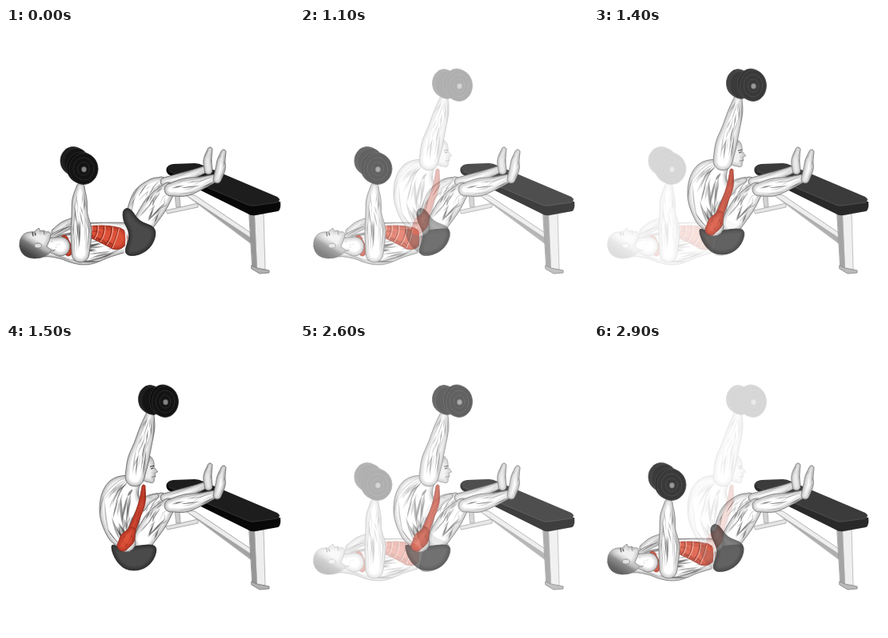
Write an HTML page with a canvas that moves like this. It is 360 by 360 pixels and loops after 3000 ms.

```html
<!DOCTYPE html>
<html lang="en">
<head>
<meta charset="utf-8">
<title>Dumbbell sit-up</title>
<style>
html, body { margin: 0; width: 100%; height: 100%; overflow: hidden; background: #fff; }
canvas { display: block; width: 360px; height: 360px; }
</style>
</head>
<body>
<canvas id="stage" width="360" height="360"></canvas>
<script>
const SIZE = 360;
const stage = document.getElementById('stage').getContext('2d');
let g;    // context being drawn into
let seed;

const random = () => (seed = seed * 16807 % 2147483647) / 2147483647;
const between = (a, b) => a + (b - a) * random();

const SKIN = { fill: '#fff', edge: '#5c5c5c', shade: '60,60,60', streak: '50,50,50' };
const RED = { fill: '#dd5139', edge: '#8e2b1c', shade: '110,15,5', streak: '100,15,8' };
const CLOTH = { fill: '#4a4a4a', edge: '#2a2a2a', shade: '0,0,0', streak: '20,20,20' };

// Catmull-Rom value at u (0..1) through a list of [x, y, r] keys.
function spline(keys, u) {
  const n = keys.length - 1;
  const i = Math.min(n - 1, Math.floor(u * n));
  const t = u * n - i;
  const key = j => keys[Math.max(0, Math.min(n, j))];
  const [a, b, c, d] = [key(i - 1), key(i), key(i + 1), key(i + 2)];
  return b.map((v, k) => v + t / 2 * (c[k] - a[k] +
    t * (2 * a[k] - 5 * v + 4 * c[k] - d[k] + t * (3 * (v - c[k]) + d[k] - a[k]))));
}

// Point in a limb: u runs along it, v across it from -1 to 1.
function inLimb(keys, u, v) {
  const [x, y, r] = spline(keys, u);
  const [ax, ay] = spline(keys, Math.max(0, u - 0.02));
  const [bx, by] = spline(keys, Math.min(1, u + 0.02));
  const len = Math.hypot(bx - ax, by - ay) || 1;
  return [x - (by - ay) / len * r * v, y + (bx - ax) / len * r * v];
}

function outline(keys) {
  const steps = 24, half = 8, path = new Path2D();
  const side = (v, back) => {
    for (let i = 0; i <= steps; i++) path.lineTo(...inLimb(keys, (back ? steps - i : i) / steps, v));
  };
  const cap = (u, from) => {
    const [x, y, r] = spline(keys, u);
    const [px, py] = inLimb(keys, u, from);
    const start = Math.atan2(py - y, px - x);
    for (let i = 1; i < half; i++) {
      const a = start + Math.PI * i / half;
      path.lineTo(x + r * Math.cos(a), y + r * Math.sin(a));
    }
  };
  side(-1, false);
  cap(1, -1);
  side(1, true);
  cap(0, 1);
  path.closePath();
  return path;
}

// Fill with soft inner shading and a thin edge.
function solid(path, tone) {
  g.fillStyle = tone.fill;
  g.fill(path);
  g.save();
  g.clip(path);
  for (const w of [10, 6, 3]) {
    g.strokeStyle = `rgba(${tone.shade},.12)`;
    g.lineWidth = w;
    g.stroke(path);
  }
  g.restore();
  g.strokeStyle = tone.edge;
  g.lineWidth = 0.8;
  g.stroke(path);
}

// Muscle: a rounded limb with slim tapering streaks along its fibres.
function muscle(keys, count = 14, tone = SKIN) {
  seed = Math.round(keys[0][0] * 977 + keys[0][1] * 31);
  solid(outline(keys), tone);
  for (let i = 0; i < count; i++) {
    const v = between(-0.9, 0.9), drift = between(-0.35, 0.35), wide = between(0.05, 0.16);
    const start = between(0, 0.75), end = Math.min(1, start + between(0.15, 0.4));
    const at = (k, w) => inLimb(keys, start + (end - start) * k,
      Math.max(-1, Math.min(1, v + drift * k + w)));
    g.beginPath();
    g.moveTo(...at(0, 0));
    g.quadraticCurveTo(...at(0.5, wide), ...at(1, 0));
    g.quadraticCurveTo(...at(0.5, -wide), ...at(0, 0));
    g.fillStyle = `rgba(${tone.streak},${between(0.2, 0.65)})`;
    g.fill();
  }
}

// Closed smooth shape through a few corner points.
function blob(points) {
  const n = points.length, path = new Path2D();
  const mid = i => {
    const [a, b] = [points[i % n], points[(i + 1) % n]];
    return [(a[0] + b[0]) / 2, (a[1] + b[1]) / 2];
  };
  path.moveTo(...mid(0));
  for (let i = 1; i <= n; i++) path.quadraticCurveTo(...points[i % n], ...mid(i));
  return path;
}

function shape(d, fill, edge) {
  const path = new Path2D(d);
  g.fillStyle = fill;
  g.fill(path);
  if (edge) stroke(path, edge);
}

function stroke(path, color, width = 0.8) {
  g.strokeStyle = color;
  g.lineWidth = width;
  g.stroke(typeof path === 'string' ? new Path2D(path) : path);
}

function disc(x, y, rx, ry, fill, edge) {
  const path = new Path2D();
  path.ellipse(x, y, rx, ry, 0, 0, Math.PI * 2);
  g.fillStyle = fill;
  g.fill(path);
  stroke(path, edge);
}

function dumbbell(back, front, rx, ry) {
  const [bx, by] = back, [fx, fy] = front;
  for (let i = 0; i < 3; i++) disc(bx + i * 2, by + i, rx - 2, ry - 2, '#141414', '#333');
  disc(fx - 3, fy - 1.5, rx, ry, '#0c0c0c', '#303030');
  for (const k of [1, 0.72, 0.42]) disc(fx, fy, rx * k, ry * k, '#131313', '#303030');
  disc(fx + 0.5, fy + 0.7, 3.2, 3.5, '#858585', '#444');
}

function bench() {
  shape('M209 184h6l3 40h-5Z', '#ccc', '#999');
  shape('M200 228L240 219V224L202 232Z', '#e2e2e2', '#999');
  shape('M224 208L236 209L306 256V269Z', '#ececec', '#999');
  shape('M224 208L306 262V269Z', '#a3a3a3');
  shape('M304 231L311 234L314 301L308 298Z', '#969696', '#888');
  shape('M311 234L322 232L324 302L314 301Z', '#eee', '#aaa');
  shape('M307 297L314 300L329 303V306L317 307L307 301Z', '#b0b0b0', '#777');
  shape('M201 174Q199 179 203 183L302 232Q306 235 312 234L340 229Q344 227 343 217L306 218Z', '#080808');
  shape('M201 175Q202 171 209 170L236 169Q241 169 247 172L339 211Q345 215 339 218L311 222Q305 223 300 220L204 179Z', '#1d1d1d');
  stroke('M204 179L300 220Q305 223 311 222L339 218', '#3b3b3b');
}

function legs() {
  muscle([[160, 233, 10], [171, 212, 13], [184, 198, 10], [194, 192, 6]], 16);
  muscle([[198, 192, 5], [220, 187, 6], [238, 181, 5], [250, 176, 4]], 8);
  muscle([[253, 178, 5], [252, 165, 5], [255, 152, 3]], 5);
  muscle([[172, 244, 13], [188, 220, 14], [203, 202, 9]], 22);
  muscle([[206, 202, 8], [224, 199, 11], [243, 194, 8], [260, 188, 5]], 18);
  muscle([[264, 189, 5], [268, 176, 6], [269, 166, 5], [272, 155, 3]], 6);
}

// Profile facing right with the crown up, before turning.
function head(x, y, scale, turn) {
  g.save();
  g.translate(x, y);
  g.rotate(turn);
  g.scale(scale, scale);
  const face = new Path2D('M-4 -20C8 -21 14 -14 14 -6L14 -2L19 4L15 6L16 10L14 13Q15 19 11 19Q3 18 -4 14L-9 20Q-19 14 -19 -2Q-18 -18 -4 -20Z');
  solid(face, SKIN);
  const hair = g.createLinearGradient(-13, -9, 5, 2);
  hair.addColorStop(0, '#444');
  hair.addColorStop(0.5, '#777');
  hair.addColorStop(1, 'rgba(200,200,200,.3)');
  g.fillStyle = hair;
  g.fill(face);
  disc(-3, 3, 3, 4.5, '#ddd', '#777');
  stroke('M9 -3L14 -4M10 0L13 -1', '#333', 1.1);
  stroke('M11 11L15 10', '#555');
  g.restore();
}

function lyingPose() {
  bench();
  legs();
  muscle([[62, 255, 5], [72, 247, 5], [81, 241, 3]], 5);
  muscle([[50, 276, 10], [70, 271, 19], [98, 270, 26], [125, 265, 22], [145, 262, 19]], 45);
  muscle([[73, 263, 4], [75, 272, 6], [78, 281, 4]], 5, RED);
  const abs = [[104, 253, 8], [120, 257, 11], [138, 263, 14]];
  muscle(abs, 14, RED);
  for (let u = 0.05; u < 1; u += 0.22) {
    for (const [shift, color] of [[0, '#872718'], [0.04, '#f2b3a4']]) {
      const path = new Path2D();
      path.moveTo(...inLimb(abs, u + shift, -0.9));
      path.quadraticCurveTo(...inLimb(abs, u + shift + 0.1, 0), ...inLimb(abs, u + shift, 0.9));
      stroke(path, color, 1);
    }
  }
  stroke('M104 246Q128 244 148 248Q153 264 148 282', '#eee', 2.2);
  solid(blob([[146, 226], [156, 225], [166, 242], [189, 249], [184, 272], [166, 285], [146, 284], [156, 258], [146, 241]]), CLOTH);
  muscle([[55, 271, 9], [68, 273, 12]], 7);
  head(37, 269, 1, -Math.PI / 2);
  muscle([[93, 199, 5], [92, 214, 9], [92, 233, 10], [94, 254, 13], [93, 282, 11]], 28);
  dumbbell([84, 166], [97, 176], 18, 19.5);
}

function sittingPose() {
  bench();
  legs();
  muscle([[170, 204, 5], [177, 195, 5], [188, 190, 3]], 6);
  solid(blob([[130, 248], [145, 257], [164, 252], [190, 250], [185, 271], [170, 283], [149, 283], [135, 268]]), CLOTH);
  head(172, 156, 0.93, 0);
  muscle([[159, 171, 10], [147, 186, 24], [143, 210, 26], [145, 234, 20], [150, 248, 12]], 46);
  muscle([[172, 178, 2], [170, 198, 4], [163, 218, 4], [156, 236, 5]], 10, RED);
  muscle([[157, 234, 5], [152, 243, 9], [146, 252, 7]], 14, RED);
  muscle([[180, 88, 5], [177, 104, 9], [171, 126, 11], [165, 146, 13], [161, 166, 12]], 30);
  dumbbell([180, 69], [199, 72], 16.5, 19.5);
}

function layer(draw) {
  const c = document.createElement('canvas');
  c.width = c.height = SIZE;
  g = c.getContext('2d');
  g.lineCap = g.lineJoin = 'round';
  draw();
  return c;
}

const lying = layer(lyingPose);
const sitting = layer(sittingPose);

// Share of the sitting pose: each fade runs in sixths, 100 ms apart.
function sitShare(t) {
  const fade = start => (Math.floor((t - start) / 100) + 1) / 6;
  if (t < 1000) return 0;
  if (t < 1500) return fade(1000);
  if (t < 2500) return 1;
  return 1 - fade(2500);
}

function frame() {
  const k = sitShare(performance.now() % 3000);
  stage.globalAlpha = 1;
  stage.fillStyle = '#fff';
  stage.fillRect(0, 0, SIZE, SIZE);
  stage.globalAlpha = 1 - k;
  stage.drawImage(lying, 0, 0);
  stage.globalAlpha = k;
  stage.drawImage(sitting, 0, 0);
  requestAnimationFrame(frame);
}
frame();
</script>
</body>
</html>
```
